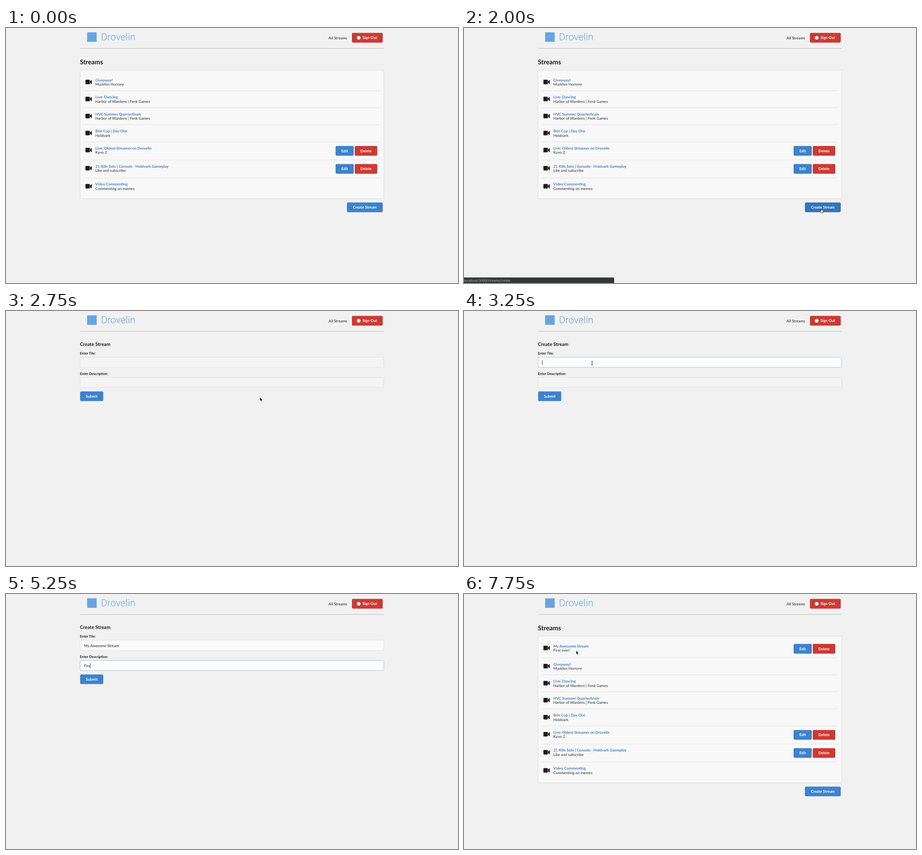
Animation, 997 px wide and 562 px high, one loop 8000 ms. Source, as an HTML page:

```html
<!DOCTYPE html>
<html lang="en">
<head>
<meta charset="utf-8">
<title>Streams</title>
<style>
  html, body { margin: 0; width: 100%; height: 100%; overflow: hidden; background: #f1f1f1; }
  svg { display: block; width: 997px; height: 562px; }
  text { font: 8.32px Lato, sans-serif; fill: #2b2b2c; text-rendering: geometricPrecision; white-space: pre; }
  .bold { font-weight: 700; }
  .link { font-weight: 700; fill: #3f7fc8; }
  .h2 { font-size: 14.27px; font-weight: 700; fill: #1c1c1d; }
  .h3 { font-size: 10.65px; font-weight: 700; fill: #1c1c1d; }
  .label { font-size: 7.73px; font-weight: 700; fill: #1c1c1d; }
  .value { fill: #1c1c1d; }
  .button text { font-weight: 700; fill: #fff; text-anchor: middle; }
  .blue rect { fill: #3d82cc; }
  .blue.hover rect { fill: #3474b8; }
  .red rect { fill: #cd3a33; }
  .brand { font: 300 21.5px Roboto, sans-serif; fill: #67a5e0; }
  .status text { font: 7px Inter, sans-serif; fill: #b4b6b8; }
  .rule { stroke: #dcdcdd; stroke-width: .8; }
  .card { fill: #f8f8f8; stroke: #d8d8d9; stroke-width: .8; }
  .field rect { fill: #f4f4f4; stroke: #dddddf; stroke-width: .8; }
  .field.filled rect { fill: #fafafa; }
  .field.focus rect { fill: #fdfdfd; stroke: #8fb7d6; }
  .caret { stroke: #222; stroke-width: .9; }
</style>
</head>
<body>
<svg id="stage" viewBox="0 0 997 562"></svg>
<script>
const LOOP = 8000, STEP = 250;
const stage = document.getElementById('stage');

const text = (x, y, cls, str) => `<text x="${x}" y="${y}" class="${cls}">${str}</text>`;

const button = (x, y, w, label, cls, id = '', shift = 0) =>
  `<g class="button ${cls}" id="${id}"><rect x="${x}" y="${y}" width="${w}" height="21.4" rx="2.4"/>
   <text x="${x + w / 2 + shift}" y="${y + 13.5}">${label}</text></g>`;

const field = (id, y) =>
  `<g class="field" id="${id}"><rect x="163.5" y="${y}" width="669.8" height="22.2" rx="2.2"/>
   <text x="172" y="${y + 14.6}" class="value"></text>
   <path class="caret" d="M0 ${y + 6.4}v10.4"/></g>`;

const camera = y =>
  `<path fill="#1c1c1d" d="M176.6 ${y - 5}h6.8q1.4 0 1.4 1.4v7.2q0 1.4-1.4 1.4h-6.8q-1.4 0-1.4-1.4v-7.2q0-1.4 1.4-1.4z
   M185.4 ${y - 2}l2.8-2.2q1-.5 1 .4v7.6q0 .9-1 .4l-2.8-2.2z"/>`;

const skull = (x, y) =>
  `<g transform="translate(${x} ${y})"><path fill="#d2d2d2" d="M-3.3-1.6Q-3-3.3 0-3.3T3.3-1.6Q3 .6 1.5 1V2.8H-1.5V1Q-3 .6-3.3-1.6z"/>
   <path fill="#4a4a4a" d="M-2.3-1.6h1.6v1.6h-1.6zM.7-1.6h1.6v1.6H.7zM-.8 1.6h1.6v.9h-1.6z"/></g>`;

const streams = [
  { title: 'Giveaway!', about: 'Murkfen Horror', skull: true },
  { title: 'Live: Dancing', about: 'Harbor of Wardens | Fenk Games' },
  { title: 'HVC Summer Quarterfinals', about: 'Harbor of Wardens | Fenk Games' },
  { title: 'Brin Cup | Day One', about: 'Holdvark' },
  { title: 'Live: Oldest Streamer on Drovelin', about: 'Kuvo 2', own: true },
  { title: '21 Kills Solo | Console - Holdvark Gameplay', about: 'Like and subscribe', own: true },
  { title: 'Video Commenting', about: 'Commenting on memes' },
];
const created = { title: 'My Awesome Stream', about: 'First ever!', own: true };

function listPage(id, rows) {
  let y = 114.8, body = '';
  rows.forEach((row, i) => {
    body += camera(y + 4.3) + text(197, y + 2.9, 'link', row.title) + text(197, y + 12.5, '', row.about);
    if (row.skull) body += skull(257.4, y + 10.2);
    if (row.own) {
      body += button(727, y - 4.8, 40, 'Edit', 'blue') + button(769.2, y - 4.8, 49.8, 'Delete', 'red');
    }
    if (i < rows.length - 1) {
      const line = y + (row.own ? 25.9 : 23.5);
      body += `<path class="rule" d="M172.4 ${line}H824.6"/>`;
      y += row.own ? 39.85 : 37.5;
    }
  });
  const bottom = y + 31.9;
  return `<g id="${id}">${text(163, 80, 'h2', 'Streams')}
    <rect x="163.5" y="93.6" width="670" height="${bottom - 93}" rx="2.4" fill="#dedede"/>
    <rect class="card" x="163.5" y="92.7" width="670" height="${bottom - 92.7}" rx="2.4"/>
    ${body}${button(752, bottom + 8.2, 79, 'Create Stream', 'blue', id + 'Create')}</g>`;
}

const cursors = {
  arrow: `<path d="M0 0V8.6L2 6.8L3.4 10L5 9.3L3.6 6.2H6.2z" fill="#111" stroke="#fff" stroke-width=".7"/>`,
  hand: `<path d="M-.9 .6Q0-.6 .8 .6V3.4L3.6 4Q4.9 4.3 4.8 5.6L4 9.4H-.6L-3 6.2Q-3.4 5-2.2 5L-.9 6z"
    fill="#fff" stroke="#111" stroke-width=".8" stroke-linejoin="round"/><path d="M.8 6v2M2.4 6v2" stroke="#111" stroke-width=".5"/>`,
  beam: `<path d="M-1.7-4.3Q0-4.3 0-3Q0-4.3 1.7-4.3M0-3V3M-1.7 4.3Q0 4.3 0 3Q0 4.3 1.7 4.3M-1 1H1"
    fill="none" stroke="#222" stroke-width=".9"/>`,
};

stage.innerHTML = `
  <rect width="997" height="562" fill="#f1f1f1"/>
  <rect x="179" y="9.5" width="21" height="21" fill="#67a5e0"/>
  ${text(209.5, 27.2, 'brand', 'Drovelin')}
  ${text(711.6, 24.9, 'value', 'All Streams')}
  ${button(763, 10.8, 68, 'Sign Out', 'red', '', 5.4)}
  <circle cx="778" cy="21.4" r="4" fill="#fff"/>
  <path d="M163.5 45H833.5" stroke="#b9b9b9" stroke-width="1"/>
  ${listPage('before', streams)}
  ${listPage('after', [created, ...streams])}
  <g id="form">
    ${text(163, 76.6, 'h3', 'Create Stream')}
    ${text(163, 96.2, 'label', 'Enter Tile:')}${field('title', 101.9)}
    ${text(163, 140.9, 'label', 'Enter Description:')}${field('about', 146.6)}
    ${button(163.5, 177.2, 51, 'Submit', 'blue', 'submit')}
  </g>
  <g id="status" class="status">
    <path d="M0 549H329q3 0 3 3V562H0z" fill="#000" opacity=".12"/>
    <path d="M0 550H328q3 0 3 3V562H0z" fill="#34383a"/>
    ${text(.6, 559, '', 'localhost:3000/streams/create')}
  </g>
  <g id="cursor">${Object.entries(cursors).map(([k, art]) => `<g id="${k}">${art}</g>`).join('')}</g>`;

// Each track lists [start ms, ...values]; values hold until the next entry.
const pointer = [
  [0, 'none', 0, 0],
  [500, 'arrow', 937, 304], [750, 'arrow', 868, 380], [1000, 'arrow', 804, 371],
  [1500, 'hand', 795, 391], [1750, 'hand', 788, 398],
  [2250, 'arrow', 787.3, 397.2], [2500, 'arrow', 776, 384],
  [2750, 'arrow', 560, 190], [3000, 'arrow', 330, 96], [3250, 'beam', 282.5, 114.7],
  [3500, 'none', 0, 0],
  [6250, 'arrow', 230, 197], [6500, 'hand', 206, 188], [6750, 'hand', 197, 184.5],
  [7000, 'arrow', 196, 184], [7500, 'arrow', 228, 150], [7750, 'arrow', 247.2, 124.6],
];
const typedTitle = [[0, 0], [3500, 1], [3750, 5], [4000, 9], [4250, 14], [4500, 17]];
const typedAbout = [[0, 0], [4750, 1], [5250, 4], [5500, 7], [5750, 9], [6000, 11]];

const at = (track, t) => track.filter(entry => entry[0] <= t).pop().slice(1);
const el = id => document.getElementById(id);
const show = (id, on) => { el(id).style.display = on ? '' : 'none'; };

function setField(id, value, focused, caretOn) {
  const box = el(id), label = box.querySelector('text'), caret = box.querySelector('.caret');
  box.classList.toggle('filled', value !== '');
  box.classList.toggle('focus', focused);
  label.textContent = value;
  const width = value ? label.getComputedTextLength() : 0;
  caret.setAttribute('transform', `translate(${172.6 + width} 0)`);
  caret.style.display = focused && caretOn ? '' : 'none';
}

function render(t) {
  const within = (from, to) => t >= from && t < to;
  const form = within(2250, 7000);
  show('before', t < 2250);
  show('form', form);
  show('after', t >= 7000);
  show('status', within(1750, 2750));
  el('beforeCreate').classList.toggle('hover', within(1500, 2250));
  el('submit').classList.toggle('hover', within(6500, 7000));

  if (form) {
    setField('title', created.title.slice(0, at(typedTitle, t)[0]), within(3250, 4750), true);
    setField('about', created.about.slice(0, at(typedAbout, t)[0]), t >= 4750, t < 6250);
  }

  const [kind, x, y] = at(pointer, t);
  Object.keys(cursors).forEach(k => show(k, k === kind));
  el('cursor').setAttribute('transform', `translate(${x} ${y})`);
}

const start = performance.now();
let last = -1;
function tick() {
  const t = Math.floor(((performance.now() - start) % LOOP) / STEP) * STEP;
  if (t !== last) render(last = t);
  requestAnimationFrame(tick);
}
tick();
</script>
</body>
</html>
```
